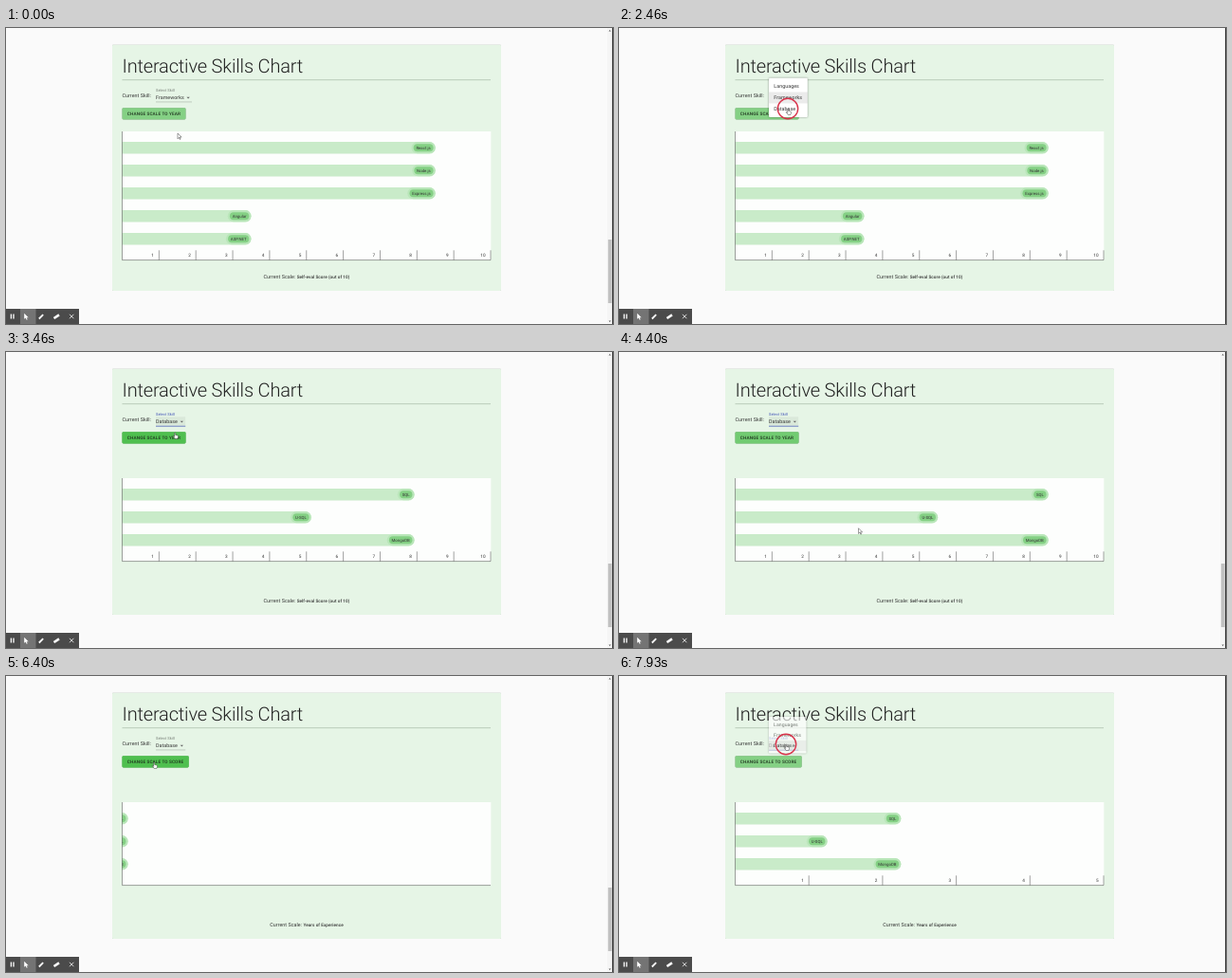
An HTML page for the animation above (8 s loop, 640 by 312 pixels).

```html
<!DOCTYPE html>
<html lang="en">
<head>
<meta charset="utf-8">
<title>Interactive Skills Chart</title>
<style>
html, body { margin: 0; height: 100%; overflow: hidden; background: #fafafa; }
svg { display: block; width: 100vw; height: 100vh; }
text { font: 5.33px Roboto, sans-serif; letter-spacing: .00938em; fill: #333; text-rendering: geometricPrecision; }
.title { font-size: 20px; font-weight: 300; letter-spacing: -.00833em; fill: #222; }
.button { font-size: 4.67px; font-weight: 500; letter-spacing: .02857em; }
.label { font-size: 4px; }
.chip { font-size: 4.33px; letter-spacing: 0; }
.tick { font-size: 4.67px; text-anchor: end; }
.caption { text-anchor: middle; }
.caption tspan { font-size: 4.67px; font-weight: 500; }
.paper { filter: drop-shadow(0 .6px .4px #0005); }
.menu { filter: drop-shadow(0 .8px 1.2px #0006); }
</style>
</head>
<body>
<svg viewBox="0 0 640 312" preserveAspectRatio="none">
  <defs><clipPath id="plot"><rect x="122.5" y="100" width="400" height="160"/></clipPath></defs>
  <rect width="640" height="312" fill="#fafafa"/>
  <rect class="paper" x="112" y="17.7" width="410" height="259.3" rx=".8" fill="#e6f5e6"/>
  <text class="title" x="122.5" y="47.4">Interactive Skills Chart</text>
  <path d="M122.5 54.7H511" stroke="#8fa08f" stroke-width=".5"/>
  <text x="122.5" y="72.7">Current Skill:</text>
  <g id="scene"></g>
  <rect x="639" width="1" height="312" fill="#444"/>
  <rect y="296" width="77" height="16" fill="#4b4b4b"/>
  <rect x="15" y="296" width="16.5" height="16" fill="#747474"/>
  <g stroke="#fff" fill="none">
    <path d="M5.4 301.5v5m2.600 0v-5" stroke-width="1.300"/>
    <path d="M19.2 300.8v6l1.500-1.300 1 2.200 1-.5-1-2h2z" fill="#fff" stroke="none"/>
    <path d="M34.800 306.500l4.400-4.400" stroke-width="1.800"/>
    <path d="M50.500 306l5.500-3.600" stroke-width="2.600"/>
    <path d="M67 301.800l4.400 4.400m0-4.400l-4.400 4.400" stroke-width=".8"/>
  </g>
  <g id="overlay"></g>
</svg>
<script>
const LOOP = 8000, LEFT = 122.5, WIDTH = 388.5, ROW = 24;
const MENU = ['Languages', 'Frameworks', 'Database'];

// Skills as [name, self-eval score, years]
const FRAMEWORKS = [['React.js', 8.5], ['Node.js', 8.5], ['Express.js', 8.5], ['Angular', 3.5], ['ASP.NET', 3.5]];
const DATABASES = [['SQL', 8.5, 2.25], ['U-SQL', 5.5, 1.25], ['MongoDB', 8.5, 2.25]];

// Mouse presses, and the delays until the page reacts and the chart is rebuilt
const OPEN = 1000, PICK = 2440, TOGGLE = 5900, REOPEN = 7790;
const REACT = 140, REBUILD = 740;

// Cursor moves as [start, duration, x, y]
const MOVES = [[80, 640, 178, 72], [1250, 950, 178, 85], [4200, 350, 300, 250],
  [4550, 490, 430, 251], [5040, 390, 156, 91], [6880, 880, 176, 72]];

const scene = document.getElementById('scene');
const overlay = document.getElementById('overlay');
const pen = document.createElement('canvas').getContext('2d');

function ramp(t, start, duration) {
  const u = Math.min(1, Math.max(0, (t - start) / duration));
  return u * u * (3 - 2 * u);
}

function textWidth(text, size) {
  pen.font = '100px Roboto, sans-serif';
  return pen.measureText(text).width * size / 100;
}

const text = (x, y, str, cls = '', fill = '') =>
  `<text x="${x}" y="${y}" class="${cls}" style="fill:${fill}">${str}</text>`;
const rect = (x, y, w, h, fill, rx = 0, cls = '') =>
  `<rect x="${x}" y="${y}" width="${w}" height="${h}" rx="${rx}" fill="${fill}" class="${cls}"/>`;

const isModal = t => t > OPEN + 80 && t < PICK + 200 || t > REOPEN + 40;
const popup = t => ramp(t, OPEN + 80, 200) - ramp(t, PICK + REACT, REACT) + ramp(t, REOPEN + 40, 170);
const dip = (t, click) => ramp(t, click + REACT, 260) - ramp(t, click + REBUILD + 20, 310);

function pointer(t) {
  return MOVES.reduce(([x, y], [start, duration, toX, toY]) => {
    const p = ramp(t, start, duration);
    return [x + (toX - x) * p, y + (toY - y) * p];
  }, [181, 111]);
}

function overButton(t) {
  const [x, y] = pointer(t);
  return !isModal(t) && x > LEFT && x < 190 && y > 84 && y < 96.5;
}

// The hover fade is the share of the last moments spent over the button.
function hover(t) {
  let hits = 0;
  for (let i = 0; i < 20; i++) hits += overButton(t - i * 12);
  return hits / 20;
}

function select(value, focused) {
  const x = 158, w = textWidth(value, 5.33) + 8.7;
  const tone = focused ? '#3f51b5' : '#747c74';
  return (focused ? rect(x, 68.3, w, 9.5, '#0000000d') : '') +
    text(x, 66.7, 'Select Skill', 'label', tone) + text(x, 75.2, value) +
    `<path d="M${x + w - 5.5} 72.800h3.300l-1.650 1.700z" fill="#666"/>` +
    rect(x, 77.8, w, focused ? .7 : .35, tone);
}

function button(scale, glow) {
  const label = 'CHANGE SCALE TO ' + scale, w = scale === 'YEAR' ? 67 : 70.2;
  return rect(LEFT, 84.2, w, 12.2, '#84d084', 1.3, 'paper') +
    `<g opacity="${glow}">${rect(LEFT, 84.2, w, 12.2, '#4fbf4f', 1.3)}</g>` +
    text(127.8, 91.7, label, 'button', '#1f331f');
}

function bar(name, length, y) {
  const end = Math.max(LEFT + length, 128.6);
  const chip = textWidth(name, 4.33) + 5.4, x = end - 2.2 - chip;
  return rect(LEFT - 20, y - 6.3, end - LEFT + 20, 12.6, '#c9ebc9', 6.3) +
    rect(x - 2.2, y - 6.1, chip + 4.4, 12.2, '#b9e6b9', 6.1) +
    rect(x, y - 4, chip, 8, '#84d084', 4) +
    text(x + 2.7, y + 1.55, name, 'chip');
}

function chart(t) {
  const rows = t < PICK + REBUILD ? FRAMEWORKS : DATABASES;
  const inYears = t > TOGGLE + REBUILD;
  const height = 15.6 + rows.length * ROW, top = 176.8 - height / 2, bottom = top + height;
  const max = inYears ? 5 : 10, unit = WIDTH / max;
  const grow = 1 - dip(t, PICK) - dip(t, TOGGLE);
  const bars = rows.map(([name, score, years], i) =>
    bar(name, (inYears ? years : score) * unit * grow, top + 17.2 + i * ROW));
  const hasTicks = t < TOGGLE + REACT || inYears;
  let axis = `M${LEFT} ${top}V${bottom}H511`, labels = '';
  for (let n = 1; hasTicks && n <= max; n++) {
    const x = LEFT + n * unit;
    axis += `M${x} ${bottom}v-10.300`;
    labels += text(x - 5.4, bottom - 3.7, n, 'tick');
  }
  return rect(LEFT, top, WIDTH + .3, height, '#fdfefd') + `<g clip-path="url(#plot)">${bars.join('')}</g>` +
    `<path d="${axis}" fill="none" stroke="#444" stroke-width=".5"/>` + labels;
}

function menu(t) {
  const p = popup(t);
  if (!p) return '';
  const chosen = t < REOPEN ? 1 : 2, top = 64.8 - chosen * 12;
  const s = 1 - .25 * (1 - p) ** 2;
  const items = MENU.map((name, i) => {
    const y = top + 2.67 + i * 12;
    return (i === chosen ? rect(158, y, 40.8, 12, '#00000014') : '') + text(163.3, y + 7.9, name);
  });
  return `<g opacity="${p}" transform="translate(158 73.5) scale(${s} ${s * s}) translate(-158 -73.5)">` +
    rect(158, top, 40.8, 41.3, '#fff', 1.3, 'menu') + items.join('') + '</g>';
}

function scrollbar() {
  return rect(634, 0, 5, 312, '#f5f5f5') + rect(634.8, 223, 3.8, 67, '#c1c1c1') +
    '<path d="M635.500 3.600l1.200-1.600 1.200 1.600zm0 304.800l1.200 1.600 1.200-1.600z" fill="#555"/>';
}

function cursor(t) {
  const [x, y] = pointer(t);
  const hand = x < 200 && y < 97;
  const shape = hand
    ? 'M-1 1q1.500-2 3 0v6l7 2q2 1 1.500 4l-2 6h-8l-6-8q1-2 3 0l1.500 2z'
    : 'M0 0v17l4-4 3 6 2-1-3-6h6z';
  const pressed = [OPEN, PICK, TOGGLE, REOPEN].some(click => t >= click && t < click + 250);
  const ring = pressed ? `<circle cx="${x}" cy="${y}" r="10.700" fill="none" stroke="#d8344c" stroke-width="1.400"/>` : '';
  return ring + `<path transform="translate(${x} ${y}) scale(.34)" d="${shape}" fill="#fff" stroke="#222" stroke-width="1.300"/>`;
}

function draw(t) {
  const toggled = t >= TOGGLE + REACT;
  const focused = t >= OPEN && t < TOGGLE || t >= REOPEN;
  const scale = toggled ? 'Years of Experience' : 'Self-eval Score (out of 10)';
  scene.innerHTML = select(t < PICK + REACT ? 'Frameworks' : 'Database', focused) +
    button(toggled ? 'SCORE' : 'YEAR', hover(t)) + chart(t) +
    text(317, 263.7, `Current Scale: <tspan>${scale}</tspan>`, 'caption') +
    (isModal(t) ? '' : scrollbar());
  overlay.innerHTML = menu(t) + cursor(t);
}

function frame() {
  draw(performance.now() % LOOP);
  requestAnimationFrame(frame);
}
frame();
</script>
</body>
</html>
```
